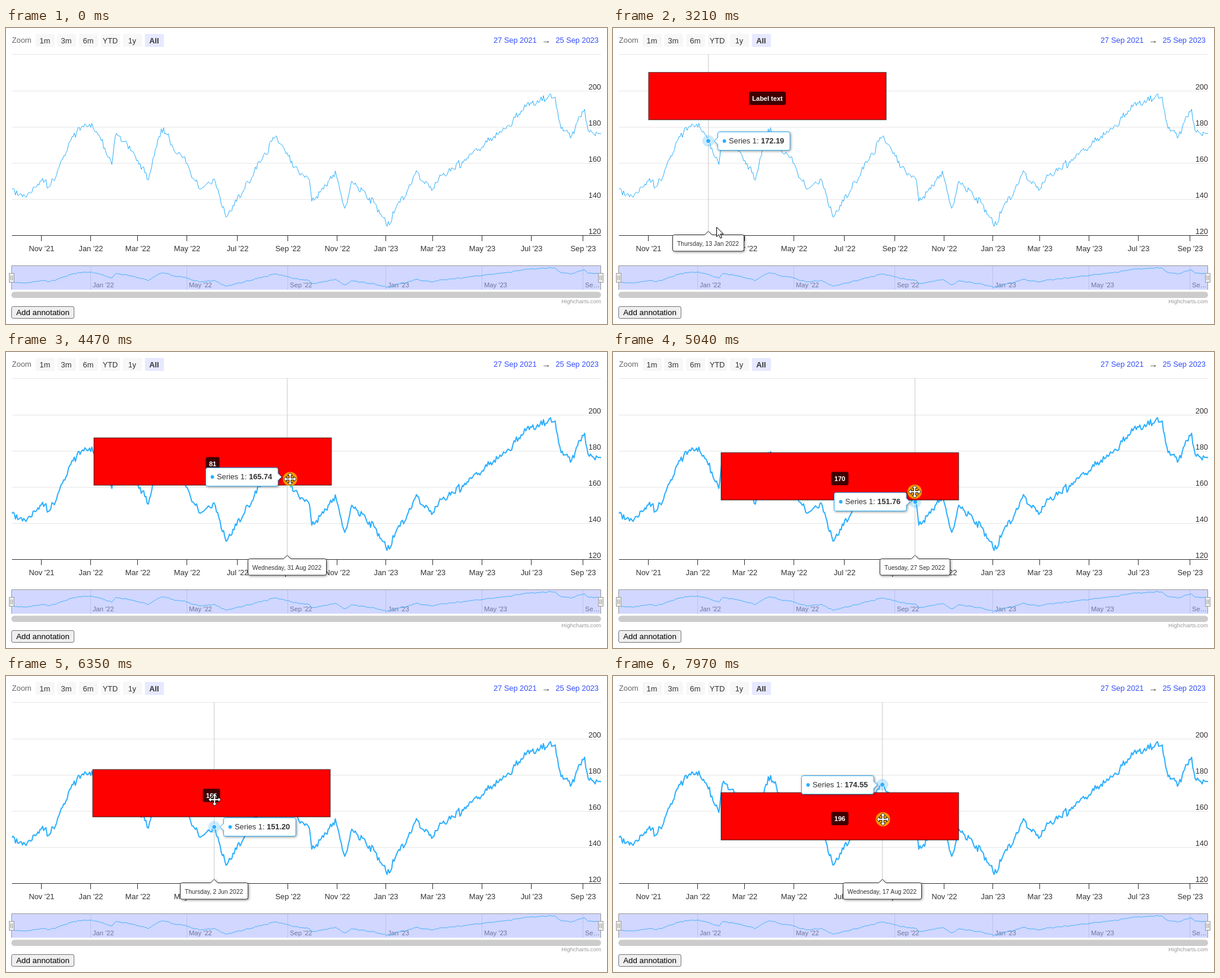
An HTML page that plays this animation: 1012x500 px, repeating every 8 s.

```html
<!DOCTYPE html>
<html lang="en">
<head>
<meta charset="utf-8">
<title>Draggable annotation</title>
<style>
  html, body { margin: 0; width: 100%; height: 100%; overflow: hidden; background: #fff; }
  svg { display: block; width: 100vw; height: 100vh; font: 12.8px "Liberation Sans", Arial, sans-serif; }
  text { white-space: pre; }
  .tip { fill: #fff; filter: drop-shadow(1px 1px 2px rgba(0, 0, 0, .45)); }
</style>
</head>
<body>
<svg id="stage" viewBox="0 0 1012 500"></svg>
<script>
const LOOP = 8000;
const TICK = 30; // the screen refreshes in steps
const LAG = 32;  // the chart follows the pointer a little late
const LEFT = 10, RIGHT = 1002, TOP = 44.5, BOTTOM = 350.5;
const BLUE = '#2caffe', INK = '#333', LINK = '#334eff';

const svg = document.getElementById('stage');

function set(node, attrs) {
  for (const key in attrs) node.setAttribute(key, attrs[key]);
  return node;
}
function add(tag, attrs, parent = svg) {
  const node = document.createElementNS('http://www.w3.org/2000/svg', tag);
  parent.appendChild(set(node, attrs));
  return node;
}
function label(text, x, y, attrs = {}, parent = svg) {
  const node = add('text', { x, y, fill: INK, ...attrs }, parent);
  node.textContent = text;
  return node;
}
const stroke = (d, color, parent = svg) => add('path', { d, stroke: color, fill: 'none' }, parent);
const show = (node, on) => { node.style.display = on ? '' : 'none'; };
const MIDDLE = { 'text-anchor': 'middle' }, END = { 'text-anchor': 'end' };

function noise(seed) {
  const v = Math.sin(seed * 127.1 + 11.7) * 43758.5453;
  return v - Math.floor(v);
}

// Main turns of the price by trading day; seeded jitter fills the days between
const turns = {
  0: 145.4, 12: 141, 24: 150, 33: 148, 56: 179.3, 68: 182, 76: 172.19, 85: 159.2, 88: 175, 100: 169.5,
  116: 150.6, 127: 179, 148: 160, 160: 145.54, 172: 151.2, 182: 130.1, 197: 144.87, 198: 145.86,
  224: 174.55, 241: 158, 252: 151.76, 255: 139, 275: 155.7, 283: 135, 289: 150, 308: 138, 319: 125,
  343: 154, 356: 147, 400: 169, 442: 193, 462: 196.5, 467: 179, 476: 175, 487: 189.7, 490: 178, 501: 176.1
};
const LAST = 501;

function buildPrices() {
  const days = Object.keys(turns).map(Number);
  const out = [];
  days.forEach((day, k) => {
    out[day] = turns[day];
    const next = days[k + 1];
    for (let d = day + 1; d < next; d++) {
      const f = (d - day) / (next - day);
      const jitter = (noise(d) + noise(Math.floor(d / 3) + .5) - 1) * 3;
      out[d] = turns[day] + (turns[next] - turns[day]) * f + jitter;
    }
  });
  return out;
}

const holidays = ['2021-11-25', '2021-12-24', '2022-01-17', '2022-02-21', '2022-04-15', '2022-05-30',
  '2022-06-20', '2022-07-04', '2022-09-05', '2022-11-24', '2022-12-26', '2023-01-02', '2023-01-16',
  '2023-02-20', '2023-04-07', '2023-05-29', '2023-06-19', '2023-07-04', '2023-09-04'];

function buildDates() {
  const out = [];
  for (let t = Date.UTC(2021, 8, 27); out.length <= LAST; t += 864e5) {
    const d = new Date(t);
    if (d.getUTCDay() % 6 && !holidays.includes(d.toISOString().slice(0, 10))) out.push(d);
  }
  return out;
}

const WEEK = ['Sunday', 'Monday', 'Tuesday', 'Wednesday', 'Thursday', 'Friday', 'Saturday'];
const MONTH = ['Jan', 'Feb', 'Mar', 'Apr', 'May', 'Jun', 'Jul', 'Aug', 'Sep', 'Oct', 'Nov', 'Dec'];
const longDate = d =>
  `${WEEK[d.getUTCDay()]}, ${d.getUTCDate()} ${MONTH[d.getUTCMonth()]} ${d.getUTCFullYear()}`;

const prices = buildPrices(), dates = buildDates();
const px = i => LEFT + i * (RIGHT - LEFT) / LAST;
const py = p => BOTTOM - (p - 120) * 3.06;
const gridY = p => Math.round(py(p) - .1) + .5;
const navY = p => 438.5 - (p - 125) * .465;
const trace = fy => 'M' + prices.map((p, i) => `${px(i).toFixed(1)} ${fy(p).toFixed(1)}`).join('L');

// Range selector
label('Zoom', 10, 25, { fill: '#666' });
['1m', '3m', '6m', 'YTD', '1y', 'All'].forEach((text, i) => {
  const x = Math.floor(50 + i * 36.8), on = text === 'All';
  add('rect', { x, y: 10, width: 32, height: 22, rx: 2, fill: on ? '#e6e9ff' : '#f7f7f7' });
  label(text, x + 15.5, 25.5, { ...MIDDLE, 'font-weight': on ? 'bold' : 'normal' });
});
label('27 Sep 2021', 821, 25, { fill: LINK });
label('→', 909.5, 25.5, { ...MIDDLE, 'font-size': 15 });
label('25 Sep 2023', 998, 25, { ...END, fill: LINK });

// Grid, both time axes, navigator
for (let p = 140; p <= 220; p += 20) stroke(`M${LEFT} ${gridY(p)}H${RIGHT}`, '#e6e6e6');
stroke(`M${LEFT} ${BOTTOM}H${RIGHT}`, INK);
add('rect', { x: 10, y: 401, width: 992, height: 41, fill: '#d1d7ff' });
for (let m = 10; m <= 32; m += 2) {
  const first = new Date(Date.UTC(2021, m, 1));
  const i = dates.filter(d => d <= first).length - 1;
  const x = Math.floor(px(i) - .5) + .5;
  const text = `${MONTH[m % 12]} '${first.getUTCFullYear() % 100}`;
  stroke(`M${x} 350V360`, INK);
  label(text, x + .5, 377, MIDDLE);
  if (m % 4) continue;
  stroke(`M${x} 402V442`, '#bac2ee');
  label(x + 40 < RIGHT ? text : text.slice(0, 2) + '…', x + 3.5, 438, { 'font-size': 11.2, fill: '#6f759b' });
}
stroke(trace(navY), '#45b1fb');
stroke('M9.5 442V401.5H1001.5V442', '#999');
for (const x of [9.5, 1001.5]) {
  add('rect', { x: x - 4, y: 414.5, width: 8, height: 15, fill: '#f2f2f2', stroke: '#999' });
  stroke(`M${x - 1.5} 418V426M${x + 1.5} 418V426`, '#888');
}
add('rect', { x: 9, y: 445.5, width: 993, height: 10.5, rx: 5.2, fill: '#ccc' });
label('Highcharts.com', 1002, 465, { ...END, 'font-size': 9.6, fill: '#999' });

const button = add('rect', { x: 9.5, y: 470.5, width: 105, height: 20, rx: 2.5 });
label('Add annotation', 62, 485, { ...MIDDLE, 'font-size': 13.33, fill: '#000' });

// Series and hover marks
const cross = stroke('', '#ccc');
const line = set(stroke(trace(py), BLUE), { 'stroke-linejoin': 'round' });
const marker = add('g', {});
add('circle', { r: 10, fill: BLUE, opacity: .25 }, marker);
add('circle', { r: 4, fill: BLUE, stroke: '#fff' }, marker);

// Annotation
const NOTE = { x: 60, y: 75, w: 400, h: 80 };
const note = add('g', {});
add('rect', { width: NOTE.w, height: NOTE.h, fill: '#f00', stroke: 'rgba(0,0,0,.75)' }, note);
const noteBox = add('rect', { y: 32.5, height: 22.5, rx: 3, fill: 'rgba(0,0,0,.75)' }, note);
const noteText = label('', 200, 48, { ...MIDDLE, 'font-size': 11, 'font-weight': 'bold', fill: '#fff' }, note);

for (let p = 120; p <= 200; p += 20) label(p, 1002, gridY(p) - 2.5, END);

// Tooltips
const tip = add('g', {});
const tipBox = add('path', { class: 'tip', stroke: BLUE }, tip);
const tipDot = add('circle', { r: 3, fill: BLUE }, tip);
const tipText = label('Series 1: ', 0, 0, {}, tip);
const tipValue = add('tspan', { 'font-weight': 'bold' }, tipText);
const day = add('g', {});
const dayBox = add('path', { class: 'tip', stroke: INK }, day);
const dayText = label('', 0, 368, { ...MIDDLE, 'font-size': 10.24 }, day);

// Pointer
const pointer = add('g', {});
const glow = add('circle', { r: 12, fill: '#ff0', opacity: .6 }, pointer);
const arrow = add('path', { d: 'M.5 .5V16.5L4.2 13L6.8 19L9.4 18L6.8 12H12Z', fill: '#fff', stroke: '#000' }, pointer);
const mover = add('g', { fill: '#fff', stroke: '#000', 'stroke-width': .9 }, pointer);
add('path', {
  d: 'M0-10.5L4.5-6H1.5V-1.5H6V-4.5L10.5 0L6 4.5V1.5H1.5V6H4.5L0 10.5L-4.5 6H-1.5V1.5H-6V4.5L-10.5 0L-6-4.5V-1.5H-1.5V-6H-4.5Z'
}, mover);

// Pointer moves; a caption is what the annotation reads once a drag arrives
const linear = u => u, easeIn = u => u * u, easeOut = u => 1 - (1 - u) ** 2;
const START = { x: 470, y: 500 };
const moves = [
  { from: 800, to: 1150, x: 295, y: 452, ease: easeOut },
  { from: 1590, to: 2380, x: 75, y: 476, ease: easeOut },
  { from: 2750, to: 3210, x: 174, y: 336, ease: easeIn },
  { from: 3210, to: 3550, x: 404, y: 150, ease: easeOut },
  { from: 3570, to: 3630, x: 386, y: 141, ease: linear },
  { from: 4110, to: 4170, x: 421, y: 173, ease: linear, caption: 78 },
  { from: 4170, to: 4890, x: 508, y: 236, ease: easeOut, caption: 170 },
  { from: 5070, to: 5270, x: 472, y: 224, ease: easeOut, caption: 165 },
  { from: 5420, to: 5600, x: 327, y: 248, ease: easeOut },
  { from: 5670, to: 6210, x: 350, y: 209, ease: easeOut },
  { from: 6230, to: 7080, x: 404, y: 200, ease: easeIn },
  { from: 7080, to: 7400, x: 418.5, y: 203, ease: easeOut },
  { from: 7600, to: 7980, x: 454.5, y: 242, ease: easeOut, caption: 196 }
];
const CLICK = [2430, 2540], NOTE_AT = 2490, THICK_AT = 3235;
const drags = [[3910, 5420], [7580, LOOP]];
const within = (t, [a, b]) => t >= a && t < b;

function at(t) {
  let { x, y } = START;
  for (const m of moves) {
    if (t < m.from) break;
    const u = m.ease(Math.min(1, (t - m.from) / (m.to - m.from)));
    x += (m.x - x) * u;
    y += (m.y - y) * u;
  }
  return { x, y };
}

function notePlace(t) {
  let { x, y } = NOTE;
  for (const [from, to] of drags) {
    if (t < from) break;
    const a = at(from), b = at(Math.min(t, to));
    x += Math.round(b.x - a.x);
    y += Math.round(b.y - a.y);
  }
  return { x, y };
}

function caption(t) {
  const m = moves.filter(m => m.caption && t > m.from).pop();
  if (!m) return 'Label text';
  return t >= m.to ? m.caption : Math.floor(noise(t / TICK) * 200);
}

function drawHover(t, pos) {
  const on = t > 2750 && pos.y > TOP && pos.y < BOTTOM;
  [cross, marker, tip, day].forEach(n => show(n, on));
  if (!on) return;
  const i = Math.round((at(t - LAG).x - LEFT) / (RIGHT - LEFT) * LAST);
  const cx = px(i), cy = py(prices[i]), mid = Math.floor(cx) + .5;
  set(cross, { d: `M${mid} 44V350` });
  set(marker, { transform: `translate(${cx} ${cy})` });

  const w = 121.5, onRight = cx < 397;
  const x0 = Math.floor(onRight ? cx + 16 : cx - 15 - w) + .5, x1 = x0 + w;
  const y0 = Math.floor(cy - 15.5) + .5, y1 = y0 + 31, m = y0 + 15.5;
  const rightSide = onRight ? '' : `V${m - 6}L${x1 + 6} ${m}L${x1} ${m + 6}`;
  const leftSide = onRight ? `V${m + 6}L${x0 - 6} ${m}L${x0} ${m - 6}` : '';
  set(tipBox, {
    d: `M${x0 + 3} ${y0}H${x1 - 3}q3 0 3 3${rightSide}V${y1 - 3}q0 3-3 3H${x0 + 3}q-3 0-3-3${leftSide}V${y0 + 3}q0-3 3-3Z`
  });
  set(tipDot, { cx: x0 + 11, cy: m });
  set(tipText, { x: x0 + 18.5, y: m + 4 });
  tipValue.textContent = prices[i].toFixed(2);

  dayText.textContent = longDate(dates[i]);
  dayText.setAttribute('x', mid - .5);
  const h = Math.round(dayText.getComputedTextLength() / 2 + 8);
  set(dayBox, {
    d: `M${mid - h + 3} 349.5H${mid - 6}L${mid} 343.5L${mid + 6} 349.5H${mid + h - 3}q3 0 3 3V374q0 3-3 3H${mid - h + 3}q-3 0-3-3V352.5q0-3 3-3Z`
  });
}

function draw(now) {
  const t = Math.round(now / TICK) * TICK;
  const pos = at(t), place = notePlace(t - LAG);
  const noted = now >= NOTE_AT;
  const dragging = drags.some(d => within(now, d));
  const pressed = dragging || within(now, CLICK);

  drawHover(t, pos);
  line.setAttribute('stroke-width', now < THICK_AT ? 1 : 2);

  show(note, noted);
  if (noted) {
    set(note, { transform: `translate(${place.x} ${place.y})` });
    noteText.textContent = caption(t);
    const w = Math.round(noteText.getComputedTextLength() + 10.6);
    set(noteBox, { x: 200 - w / 2, width: w });
  }

  const over = pos.x < 115 && pos.y > 470 && pos.y < 491;
  set(button, {
    fill: over ? (pressed ? '#f5f5f5' : '#e5e5e5') : '#efefef',
    stroke: over && !pressed ? '#4f4f4f' : '#767676'
  });

  const inside = noted && (dragging ||
    (pos.x > place.x && pos.x < place.x + NOTE.w && pos.y > place.y && pos.y < place.y + NOTE.h));
  show(pointer, now >= moves[0].from);
  show(glow, pressed);
  show(arrow, !inside);
  show(mover, inside);
  set(pointer, { transform: `translate(${pos.x} ${pos.y})` });
}

const start = performance.now();
function frame() {
  draw((performance.now() - start) % LOOP);
  requestAnimationFrame(frame);
}
frame();
</script>
</body>
</html>
```
